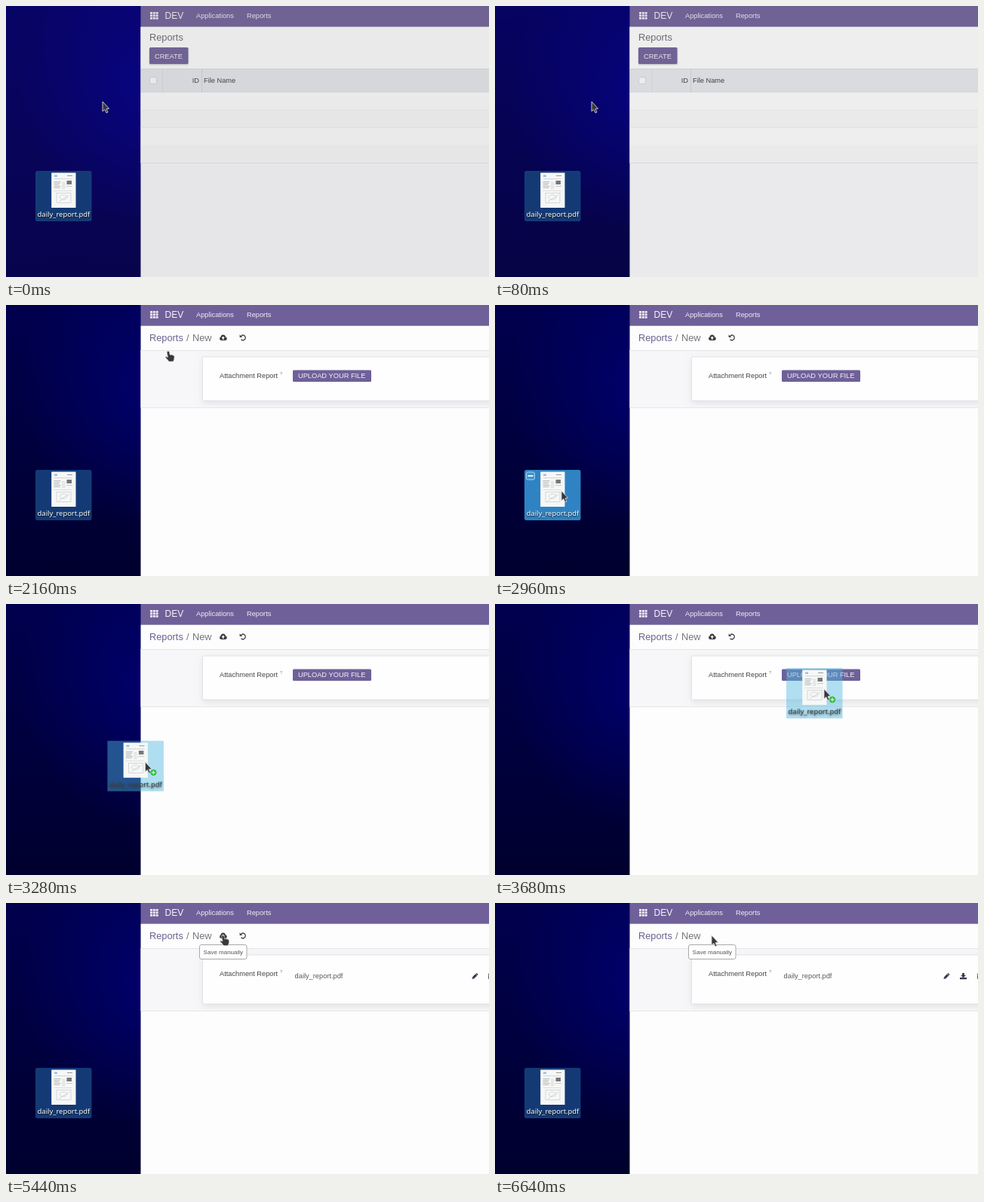
An HTML page with a canvas that plays this animation: 640x360 px, repeating every 6.96 s.

```html
<!DOCTYPE html>
<html lang="en">
<head>
<meta charset="utf-8">
<title>Report upload</title>
<style>
  html, body { margin: 0; width: 100%; height: 100%; overflow: hidden; background: #000038; }
  canvas { display: block; }
</style>
</head>
<body>
<canvas id="stage" width="640" height="360"></canvas>
<script>
const c = document.getElementById('stage').getContext('2d');
const LOOP = 6960;
const FORM = 1760, GRAB = 3080, DROP = 4000, TIP = 5440, SAVE = 5760;
const LEFT = 178.5, WIDTH = 640 - LEFT, BAR = 27.5;
const SANS = '"Liberation Sans", Arial, sans-serif';
const LABEL = '"Noto Sans", "Open Sans", sans-serif';
const PURPLE = '#6f6099', INK = '#4c4e50';

// Pointer stops: time, x, y
const path = [
  [80, 128, 127], [800, 211, 59], [1200, 214.5, 61.5], [2240, 214.5, 61.5],
  [2880, 88, 247], [GRAB, 88, 247], [3660, 436, 113], [3700, 436, 113],
  [3900, 444, 98], [4560, 444, 98], [5200, 287, 43]
];

function pointerAt(t) {
  let i = path.findIndex(p => p[0] > t);
  if (i < 0) i = path.length;
  const a = path[Math.max(i - 1, 0)], b = path[Math.min(i, path.length - 1)];
  const u = b[0] > a[0] ? (t - a[0]) / (b[0] - a[0]) : 0;
  const e = u * u * (3 - 2 * u);
  return [a[1] + (b[1] - a[1]) * e, a[2] + (b[2] - a[2]) * e];
}

function rect(x, y, w, h, fill) {
  c.fillStyle = fill;
  c.fillRect(x, y, w, h);
}

const band = (y, h, fill) => rect(LEFT, y, WIDTH, h, fill);

function box(x, y, w, h, r, fill, stroke) {
  c.beginPath();
  c.roundRect(x, y, w, h, r);
  if (fill) { c.fillStyle = fill; c.fill(); }
  if (stroke) { c.strokeStyle = stroke; c.lineWidth = 1; c.stroke(); }
}

function text(s, x, y, color = INK, size = 9.25, family = SANS) {
  c.font = size + 'px ' + family;
  c.fillStyle = color;
  c.fillText(s, x, y);
}

function shape(points, fill, stroke, width = 1) {
  c.beginPath();
  points.forEach(([x, y]) => c.lineTo(x, y));
  c.closePath();
  c.fillStyle = fill;
  c.fill();
  if (stroke) {
    c.strokeStyle = stroke;
    c.lineWidth = width;
    c.lineJoin = 'round';
    c.stroke();
  }
}

function at(x, y, draw) {
  c.save();
  c.translate(x, y);
  draw();
  c.restore();
}

function shadow(color, blur, y = 0) {
  c.shadowColor = color;
  c.shadowBlur = blur;
  c.shadowOffsetY = y;
}

function desktop() {
  const base = c.createLinearGradient(0, 0, 0, 360);
  base.addColorStop(0, '#00004e');
  base.addColorStop(1, '#00002e');
  rect(0, 0, 179, 360, base);
  const glow = c.createRadialGradient(205, 110, 0, 205, 110, 190);
  glow.addColorStop(0, 'rgba(0,0,125,.75)');
  glow.addColorStop(1, 'rgba(0,0,125,0)');
  rect(0, 0, 179, 360, glow);
}

function paper() {
  box(21.2, 2.5, 32.3, 46.5, .5, '#f6f7f7');
  rect(25, 5.5, 4, 2.5, '#9cc0e0');
  rect(42, 6, 7, 1, '#999');
  rect(25, 10.5, 24, .6, '#bbb');
  for (let i = 0; i < 5; i++) {
    rect(24.5, 14 + i * 2, 9 - i % 3, .8, '#aaa');
    rect(35, 15 + i * 2, 4 + i % 2, .7, '#ccc');
  }
  rect(41.5, 13, 6.5, 5, '#777');
  rect(41, 20, 8, .8, '#bbb');
  rect(24.5, 26, 24, .6, '#ccc');
  c.strokeStyle = '#c0c2c4';
  c.lineWidth = .6;
  c.strokeRect(28, 29.5, 19, 13);
  c.beginPath();
  c.ellipse(37, 35, 5, 3, 0, 0, 7);
  c.moveTo(31, 41);
  c.lineTo(45, 32);
  c.stroke();
}

function file(x, y, mode) {
  at(x, y, () => {
    const ghost = mode === 'ghost', hover = mode === 'hover';
    const fill = ghost ? 'rgba(80,185,225,.45)' : hover ? '#2f83c2' : '#143a76';
    box(0, 0, 74.5, 67, ghost ? 0 : 2.5, fill);
    paper();
    if (hover) {
      box(2.5, 3, 11, 10, 2, '#3f94d0', '#a9d5ef');
      rect(4.5, 7, 7, 2, '#e3f2fb');
    }
    shadow(ghost ? '#222' : '#000', ghost ? 3 : 2, 1);
    text('daily_report.pdf', 2.6, 61.3, ghost ? '#3c4a52' : '#fff', 9.4, LABEL);
  });
}

function navbar() {
  band(0, BAR, PURPLE);
  for (let i = 0; i < 9; i++) rect(191 + i % 3 * 3.8, 8 + (i / 3 | 0) * 3.5, 3, 2.7, '#f0edf6');
  text('DEV', 210.5, 17, '#f7f5fa', 12);
  text('Applications', 252, 16.3, '#f0edf6');
  text('Reports', 319, 16.3, '#f0edf6');
}

function list(hover) {
  band(BAR, 360 - BAR, '#f8f8fa');
  band(BAR, 56, '#fefefe');
  text('Reports', 190, 45.5, '#686a6e', 12.8);
  c.save();
  shadow('rgba(0,0,0,.25)', 2, 1);
  box(190, 55, 51.5, 22, 1.5, hover ? '#5f4f88' : PURPLE);
  c.restore();
  text('CREATE', 197, 69.5, '#f6f4fa');
  band(83, 32, '#e5e8eb');
  band(83, 1, '#dcdfe2');
  rect(207, 84, 1, 31, '#dadde1');
  rect(259, 84, 1, 31, '#d2d5d9');
  box(190.5, 94.5, 9, 9, 2.5, '#fbfbfb', '#d3d6d9');
  text('ID', 246.8, 102.3, '#3a3c3e');
  text('File Name', 262, 102.3, '#3a3c3e');
  for (let i = 0; i < 4; i++) {
    band(115 + i * 23.3, 23.3, i % 2 ? '#f9f9f9' : '#fefefe');
    band(Math.round(138 + i * 23.3), 1, '#e3e4e6');
  }
}

function cloud() {
  at(282.7, 38.5, () => {
    c.fillStyle = '#3c3c40';
    for (const [x, y, r] of [[2.7, 6.2, 2.4], [5, 3.9, 3], [7.7, 6.2, 2.4]]) {
      c.beginPath();
      c.arc(x, y, r, 0, 7);
      c.fill();
    }
    rect(2.7, 5, 5, 3.6, '#3c3c40');
    shape([[5, 3], [7.2, 5.4], [5.8, 5.4], [5.8, 7.5], [4.2, 7.5], [4.2, 5.4], [2.8, 5.4]], '#fff');
  });
}

function undo() {
  c.strokeStyle = '#444448';
  c.lineWidth = 1.3;
  c.beginPath();
  c.arc(314, 43.5, 3.3, -2.5, 2.4);
  c.stroke();
  shape([[309.6, 39.2], [309.6, 43], [313.2, 43]], '#444448');
}

function pencil(x) {
  at(x, 97.5, () => {
    c.rotate(Math.PI / 4);
    rect(-1.5, -5, 3, 1.6, '#3c3552');
    rect(-1.5, -3, 3, 5.6, '#3c3552');
    shape([[-1.5, 2.6], [1.5, 2.6], [0, 5]], '#3c3552');
  });
}

function download(x) {
  shape([[x - 1.4, 93], [x + 1.4, 93], [x + 1.4, 96], [x + 3.4, 96], [x, 99.3],
         [x - 3.4, 96], [x - 1.4, 96]], '#3c3552');
  rect(x - 4.5, 99, 9, 2.3, '#3c3552');
}

function form(t, hover) {
  const filled = t >= DROP, saved = t >= SAVE;
  const grow = filled ? 7 : 0;
  band(BAR, 360 - BAR, '#fdfdfd');
  band(60, 76 + grow, '#f7f7fa');
  band(60, 1, '#e4e5e8');
  band(136 + grow, 1, '#e6e7e9');
  c.save();
  c.beginPath();
  c.rect(LEFT, 61, WIDTH, 75 + grow);
  c.clip();
  shadow('rgba(0,0,0,.09)', 8, 3);
  box(260.5, 69, 400, 58 + grow, 0, '#fefefe');
  c.restore();
  box(260.5, 69, 400, 58 + grow, 0, null, '#e2e3e6');

  text('Reports', 190, 47.5, '#6c628f', 12.8);
  text('/', 239, 47.5, '#777', 12.8);
  text('New', 247, 47.5, '#74767c', 12.8);
  if (!saved) { cloud(); undo(); }
  text('Attachment Report', 283, 96.8, '#444648');
  text('?', 363, 92.5, '#4d8690', 5.5);

  if (!filled) {
    box(380, 86.4, 104, 15.6, 1.5, PURPLE);
    text('UPLOAD YOUR FILE', 387, 97.4, '#f6f4fa');
    return;
  }
  text('daily_report.pdf', 382.6, 100.2, '#585a5d');
  if (hover) rect(380, 107, 230, 1, '#cccdd1');
  pencil(saved ? 598 : 621);
  if (saved) download(620.5);
  rect(638.8, 94, 1.2, 1.4, '#3c3552');
  rect(639.2, 96, .8, 5, '#3c3552');
}

function tooltip() {
  box(256.5, 55.5, 62.5, 19, 2.5, '#fefefe', '#a9a9ac');
  text('Save manually', 261.6, 68, '#555', 8);
}

const arrow = () => shape([[0, 0], [0, 13], [2.8, 10.6], [5, 15], [7, 14], [5, 9.8], [8.6, 9.3]],
  '#38383c', '#d4d4d8', .9);

const hand = () => shape([[-.8, 0], [1, 0], [2, 1], [2.7, 4.8], [5, 4.6], [7.5, 5.6], [8.6, 7],
  [8.3, 10.5], [7, 13.6], [1.5, 13.6], [-1, 10.5], [-3.2, 8.2], [-2.6, 6.9], [0, 8], [-1.2, 2]],
  '#38383c', '#c8c8cc', .7);

function beam() {
  rect(-.5, -6, 1, 12, '#555');
  rect(-2, -6.5, 4, .8, '#555');
  rect(-2, 5.7, 4, .8, '#555');
}

function draw(t) {
  const [x, y] = pointerAt(t);
  const inside = (l, top, r, b) => x >= l && x <= r && y >= top && y <= b;
  const dragging = t >= GRAB && t < DROP;
  const onCreate = t < FORM && inside(190, 55, 242, 77);
  const onField = t >= DROP && inside(380, 86, 610, 108);
  const onCloud = t >= DROP && t < SAVE && inside(281, 36, 295, 51);
  const veil = .14 * Math.max(0, 1 - t / 400);

  desktop();
  rect(0, 0, 179, 360, `rgba(60,30,255,${veil})`);
  if (!dragging) file(39, 219, t > GRAB - 500 && inside(39, 219, 114, 286) ? 'hover' : '');
  if (t < FORM) list(onCreate); else form(t, onField);
  navbar();
  band(0, 360, `rgba(118,114,118,${veil})`);

  if (t >= TIP) tooltip();
  if (dragging) file(x - 50, y - 28, 'ghost');
  const waiting = t >= FORM && t <= 2240;
  at(x, y, onField ? beam : onCreate || onCloud || waiting ? hand : arrow);
  if (dragging) {
    c.beginPath();
    c.arc(x + 11, y + 14, 4.2, 0, 7);
    c.fillStyle = '#2fbd3c';
    c.fill();
    rect(x + 8.5, y + 13.4, 5, 1.2, '#d9f7dc');
    rect(x + 10.4, y + 11.5, 1.2, 5, '#d9f7dc');
  }
}

const start = performance.now();
function tick() {
  draw((performance.now() - start) % LOOP);
  requestAnimationFrame(tick);
}
tick();
</script>
</body>
</html>
```
